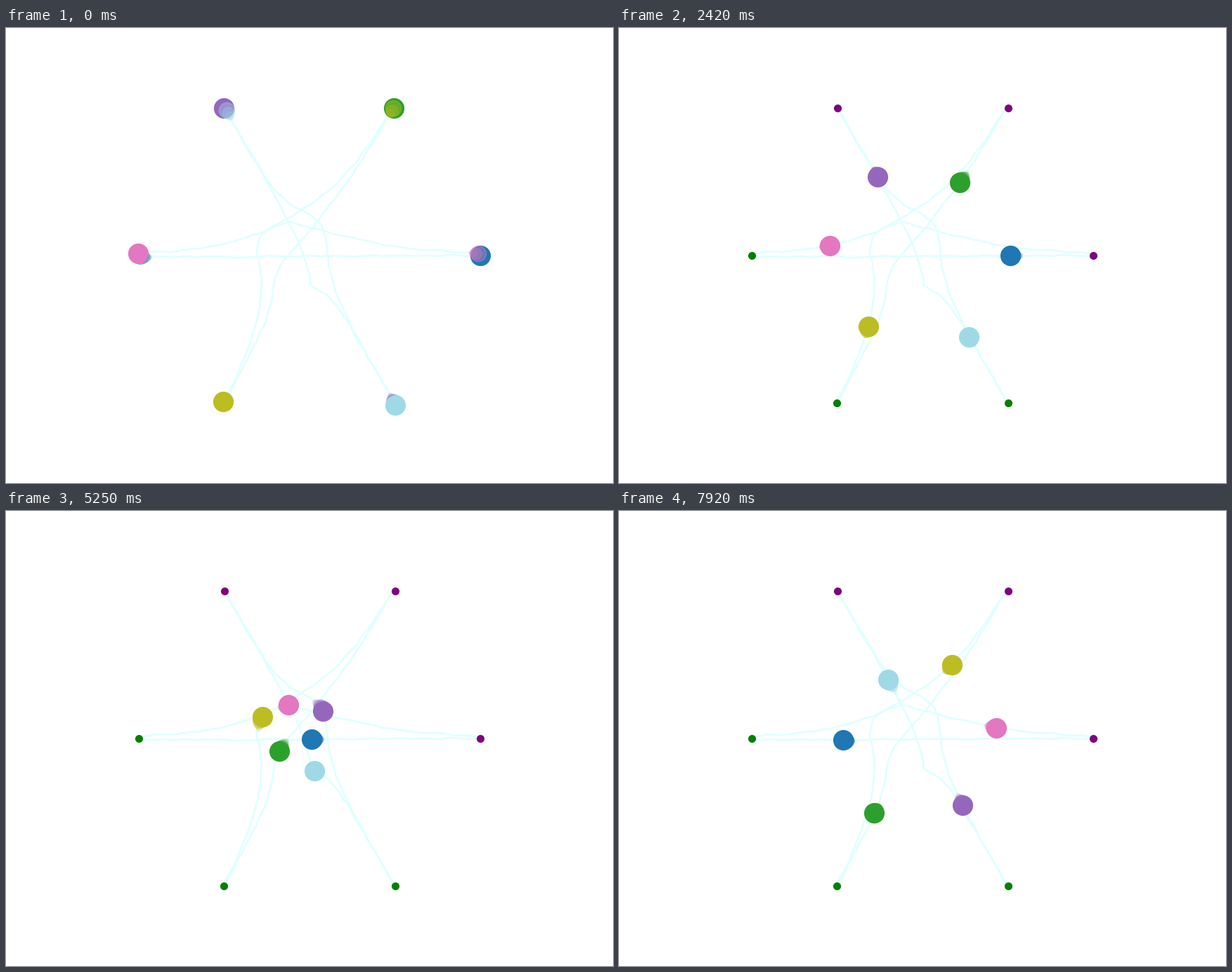
Animation, 864 px wide and 648 px high, one loop 8000 ms. Source, as a matplotlib script:

```python
import numpy as np
import matplotlib.pyplot as plt
from matplotlib.animation import FuncAnimation

W, H, DPI = 864, 648, 100
FRAMES, INTERVAL = 200, 40
STEP_MS = 1000 / 12  # the agents move twelve times a second
LEAD_MS = 34         # never show a step late on the 40 ms clock
STEPS = 128          # moves in a full crossing
RADIUS = 243
TAIL = 5

t = np.arange(STEPS)
rng = np.random.default_rng(4)


def bump(height, peak, width):
    return height * np.exp(-(np.abs(t - peak) / width) ** 1.3)


def direction(k):
    a = k * np.pi / 3
    return np.array([np.cos(a), -np.sin(a)])


def crossing(k, slip, sway):
    """Cross the ring along a diameter: slip delays, sway moves sideways."""
    along = direction(k)
    side = np.array([-along[1], along[0]])
    pace = np.interp(t, [0, 13, 95, STEPS - 1], [RADIUS, 183, -113, -241])
    noise = rng.normal(0, 1.2, (2, STEPS))
    wobble = [np.convolve(n, np.ones(5) / 5, "same") for n in noise]
    u = pace + bump(*slip) + wobble[0]
    v = bump(*sway) + wobble[1]
    return [W / 2, H / 2] + np.outer(u, along) + np.outer(v, side)


# (height, peak step, width) of the delay and of the sidestep
tracks = [
    crossing(0, (0, 60, 20), (2, 95, 40)),
    crossing(1, (-42, 66, 26), (-28, 62, 24)),
    crossing(2, (27, 57, 18), (38, 62, 14)),
    crossing(3, (27, 63, 27), (47, 63, 30)),
    crossing(4, (9, 57, 9), (75, 62, 24)),
    crossing(5, (48, 69, 25), (20, 65, 10)),
]
colors = plt.get_cmap("tab20")(np.linspace(0, 1, len(tracks)))

fig = plt.figure(figsize=(W / DPI, H / DPI), dpi=DPI, facecolor="white")
ax = fig.add_axes([0, 0, 1, 1])
ax.set_xlim(0, W)
ax.set_ylim(H, 0)
ax.axis("off")

for k, track in enumerate(tracks):
    ax.plot(*track.T, color="lightcyan", lw=2, zorder=1)
    x, y = [W / 2, H / 2] + RADIUS * direction(k)
    ax.plot(x, y, "o", ms=7, color="purple" if k < 3 else "green",
            snap=False, zorder=2)

# Per agent: fading tail first, then the dot on top.
dots = []
for k, (track, color) in enumerate(zip(tracks, colors)):
    for lag in reversed(range(TAIL)):
        fade = 1 - lag / TAIL
        dot, = ax.plot([], [], "o", ms=20 * fade, color=color, snap=False,
                       alpha=0.5 * fade if lag else 1, zorder=3 + k)
        dots.append((dot, track, lag))


def draw(frame):
    step = int((frame * INTERVAL + LEAD_MS) / STEP_MS)
    for dot, track, lag in dots:
        x, y = track[(step - lag) % STEPS]
        dot.set_data([x], [y])
    return [d[0] for d in dots]


anim = FuncAnimation(fig, draw, frames=FRAMES, interval=INTERVAL,
                     repeat=True, repeat_delay=0, blit=False)
plt.show()
```
